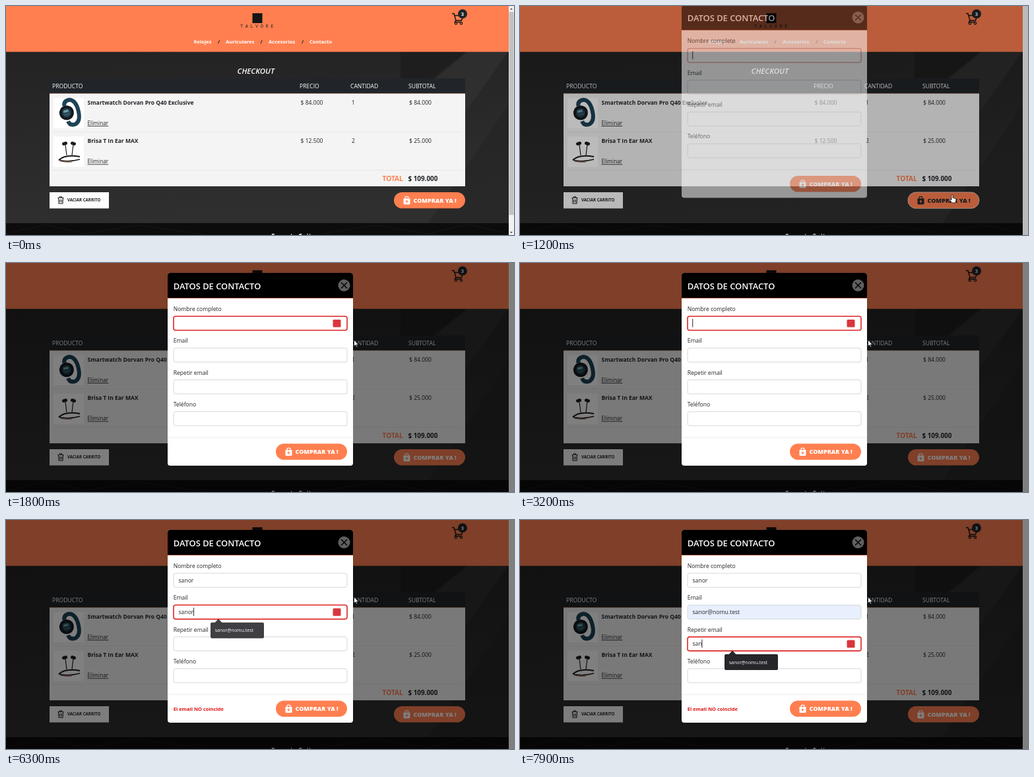
Animation, 770 px wide and 348 px high, one loop 8000 ms. Source, as an HTML page:

```html
<!DOCTYPE html>
<html lang="es">
<head>
<meta charset="utf-8">
<title>Checkout</title>
<style>
  html, body { margin: 0; width: 100%; height: 100%; overflow: hidden; background: #fff; }
  svg { display: block; width: 770px; height: 348px; }
  text { font-family: "Open Sans", "Noto Sans", sans-serif; font-size: 8.6px; fill: #212529; white-space: pre; }
  .b { font-weight: 700; }
  .w { fill: #fff; }
  .nav text { font-size: 7.6px; font-weight: 700; }
</style>
</head>
<body>
<svg id="stage" viewBox="0 0 770 348"></svg>
<script>
const ORANGE = '#ff7f50', RED = '#e02828', DARK = '#212529';
const MAIL = 'sanor@nomu.test', NAME = 'sanor';
const $ = id => document.getElementById(id);

const text = (x, y, s, attrs = '') => `<text x="${x}" y="${y}" ${attrs}>${s}</text>`;
const rect = (x, y, w, h, fill, attrs = '') =>
  `<rect x="${x}" y="${y}" width="${w}" height="${h}" fill="${fill}" ${attrs}/>`;
const path = (d, attrs = '') => `<path d="${d}" ${attrs}/>`;

const buyButton = (x, y, id) => `
  <g id="${id}" transform="translate(${x} ${y})" fill="#fff">
    ${rect(0, 0, 108, 24.6, ORANGE, 'rx="12.3" class="pill"')}
    ${path('M14.5 9.5h10v7.5q0 1.5-1.5 1.5h-7q-1.5 0-1.5-1.5z')}
    ${path('M17 9.5v-1q0-1.8 2.5-1.8t2.5 1.8v1', 'fill="none" stroke="#fff" stroke-width="1.2" class="handle"')}
    ${path('M17.3 14h4.4M19.5 11.8v4.4', `stroke="${ORANGE}" stroke-width="1.2"`)}
    <text x="29.5" y="15.8" style="font-size:9px;font-weight:800;fill:inherit">COMPRAR YA !</text>
  </g>`;

const productRow = (y, name, price, count, subtotal) => `
  ${rect(72, y + 7, 46, 46, '#fff')}
  ${text(123.5, y + 17, name, 'class="b" style="font-size:8.5px"')}
  ${text(123.5, y + 48, 'Eliminar', 'style="font-size:8.3px" text-decoration="underline"')}
  ${text(446.5, y + 17, price)}${text(524, y + 17, count)}${text(611, y + 17, subtotal)}
  ${rect(71, y + 58, 620, 0.7, '#e2e2e2')}`;

const background = `
  ${rect(0, 69, 762, 261, 'url(#wall)')}
  ${path('M598 69h100L598 150z', 'fill="#1c1c1c" opacity=".7"')}
  ${path('M700 69h62L640 240 598 215V155z', 'fill="#343434" opacity=".6"')}
  ${path('M762 150v180H640z', 'fill="#222" opacity=".5"')}
  ${rect(0, 330, 762, 18, '#0c0c0c')}
  ${path('M0 346 60 332 120 346 200 333 300 347M480 346 560 333 640 346 700 332 762 346', 'fill="none" stroke="#1c1c1c" stroke-width=".7"')}
  ${text(402, 354, 'Soporte Suite', 'class="b w" style="font-size:10px"')}`;

const header = `
  ${rect(0, 0, 762, 69.7, ORANGE)}
  ${rect(373.5, 11, 15, 15, '#151515')}
  <text x="355" y="33" style="font-family:'Noto Sans Mono',monospace;font-size:7px;letter-spacing:3.5px">TALVORE</text>
  <g class="nav">
    ${[[284.5, 'Relojes'], [333, 'Auriculares'], [398, 'Accesorios'], [460, 'Contacto']]
      .map(([x, s]) => text(x, 57.3, s, 'class="w"')).join('')}
    ${[321, 385.5, 448].map(x => text(x, 57.3, '/')).join('')}
  </g>
  ${path('M676 11.5h3l3 10.5h8.5l2.5-7.5H680M682 22l-1.5 2.5H691', 'fill="none" stroke="#151515" stroke-width="1.5"')}
  <circle cx="682" cy="26.2" r="1.7" fill="none" stroke="#151515" stroke-width="1.2"/>
  <circle cx="690" cy="26.2" r="1.7" fill="none" stroke="#151515" stroke-width="1.2"/>
  <circle cx="692" cy="12" r="7" fill="${DARK}"/>
  ${text(692, 14.8, '3', 'class="b w" style="font-size:7.5px" text-anchor="middle"')}`;

const watch = `
  <g transform="rotate(-14 97 162)">
    ${path('M91 150q1-8 10-7 9 3 9 19t-9 19q-9 1-10-7', 'fill="none" stroke="#1d4356" stroke-width="6"')}
    <circle cx="92" cy="161" r="11" fill="#14191e"/>
    <circle cx="92" cy="161" r="7" fill="#22404f"/>
    ${path('M88 157h7v3h-7zM88 163.500h8', 'fill="#6fa9b5" stroke="#56808c"')}
  </g>`;

const earphones = `
  <g fill="none" stroke="#1e1b1b">
    ${path('M90 211l2 16M102 210l-2 17', 'stroke-width="1.2"')}
    ${path('M87.500 209.500l3-1M100.500 208.500l3 1', 'stroke-width="5" stroke-linecap="round"')}
    ${path('M80 234q10-9 32-5M80 234q14 4 32-1', 'stroke-width="1.800"')}
    ${path('M82 236q10 2 18 1', 'stroke="#8a4a36"')}
  </g>`;

const cart = `
  ${text(350.5, 103.2, 'CHECKOUT', 'class="w" style="font-size:11.5px;font-weight:600;font-style:italic"')}
  ${rect(66, 110, 630, 23, DARK)}
  ${rect(66, 133, 630, 141, '#f4f4f4')}
  ${rect(66, 132.6, 630, 0.6, '#a8664c')}
  ${[[70, 'PRODUCTO'], [445, 'PRECIO'], [522, 'CANTIDAD'], [610, 'SUBTOTAL']]
    .map(([x, s]) => text(x, 125.2, s, 'class="w"')).join('')}
  ${productRow(133, 'Smartwatch Dorvan Pro Q40 Exclusive', '$ 84.000', 1, '$ 84.000')}
  ${productRow(191.4, 'Brisa T In Ear MAX', '$ 12.500', 2, '$ 25.000')}
  ${watch}${earphones}
  ${text(570.5, 265.5, 'TOTAL', `class="b" style="font-size:10.1px;fill:${ORANGE}"`)}
  ${text(609.5, 265.5, '$ 109.000', 'class="b" style="font-size:9.9px"')}
  ${rect(66, 283, 90, 24.6, '#fcfcfc')}
  ${path('M78.5 291.5h9M81.5 291.3v-1.5h3v1.5M79.5 292l.6 8.3h5.8l.6-8.3M81.8 294v4.5M84.2 294v4.5', 'fill="none" stroke="#212529" stroke-width="1.1"')}
  ${text(93, 297.3, 'VACIAR CARRITO', 'class="b" style="font-size:6.15px"')}
  ${buyButton(588, 283, 'buy')}`;

const field = (label, i) => {
  const y = 81 + i * 48.3;
  return `
    ${text(253.7, y - 8, label)}
    ${rect(254, y, 263, 21.3, '#fff', `id="bg${i}" rx="3" stroke="#ced4da" stroke-width=".9"`)}
    ${rect(254, y, 263, 21.3, 'none', `id="ring${i}" rx="3" stroke-width="1.6"`)}
    ${text(261.5, y + 13.7, '', `id="val${i}"`)}
    ${rect(0, y + 4, 0.9, 12.5, '#111', `id="caret${i}"`)}
    ${rect(495.5, y + 5, 12, 11.5, '#d9363e', `id="icon${i}" rx="1.5"`)}`;
};

const tip = (i, label, w) => {
  const y = 102.5 + i * 48.3;
  return `<g id="tip${i}">
    ${path(`M322 ${y - 0.5}l5.5 5.7h-11z`, 'fill="#26262b"')}
    ${rect(310, y + 5, w, 24, '#26262b', 'rx="2"')}
    ${text(316.7, y + 19.6, label, 'class="w" style="font-size:7px"')}</g>`;
};

const modal = `
  <g id="modal">
    ${rect(245, 15, 281, 293, '#fff', 'rx="4"')}
    ${path('M245 53.5V19q0-4 4-4h273q4 0 4 4v34.5z')}
    ${rect(245, 53, 281, 0.6, ORANGE)}
    ${text(253.7, 39.5, 'DATOS DE CONTACTO', 'class="w" style="font-size:12.9px;font-weight:600"')}
    <circle cx="512.5" cy="34" r="9" fill="#606060"/>
    ${path('M508 29.5l9 9m0-9l-9 9', 'stroke="#000" stroke-width="1.5"')}
    ${['Nombre completo', 'Email', 'Repetir email', 'Teléfono'].map(field).join('')}
    ${rect(245, 264.7, 281, 0.7, '#dee2e6')}
    ${text(253.7, 290, 'El email NO coincide', 'id="error" class="b" style="font-size:7.5px;fill:#dc1414"')}
    ${buyButton(409, 274.5, 'send')}
    ${tip(0, 'Sanor', 40)}${tip(1, MAIL, 81)}${tip(2, MAIL, 81)}
  </g>`;

const pointers = `
  <g fill="#fff" stroke="#000" stroke-width=".7" stroke-linejoin="round">
    ${path('M0 0v9.5l2.2-2 1.5 3.3 1.4-.6-1.5-3.2h3z', 'id="arrow"')}
    ${path('M-1 0q1-1 2 0v4.5l4 1q1.2.5 1 2l-1 4.5h-5.5l-3-4.5q0-1.3 1.3-.8l1.2 1z', 'id="hand"')}
  </g>`;

$('stage').innerHTML = `
  <defs><linearGradient id="wall" x2=".15" y2="1">
    <stop stop-color="#232323"/><stop offset=".5" stop-color="#292929"/><stop offset="1" stop-color="#2f2f2f"/>
  </linearGradient></defs>
  ${rect(762, 0, 8, 348, '#fff')}
  <g id="scroll">${rect(762, 0, 8, 348, '#f1f1f1')}${rect(762.5, 9, 7, 308.5, '#c1c1c1')}
    ${path('M764 5.5l2-2.5 2 2.5zM764 343l2 2.5 2-2.5z', 'fill="#555"')}</g>
  ${background}${header}${cart}
  ${rect(0, 0, 770, 348, '#000', 'id="shade"')}
  ${modal}${pointers}`;

const ramp = (t, start, len) => Math.min(1, Math.max(0, (t - start) / len));
const show = (id, on) => $(id).setAttribute('opacity', +on);
const easeOut = k => 1 - (1 - k) ** 1.7;

// keys: moment of each typed letter; tip: fade in and fade out
const fields = [
  { focus: 1200, blur: 4800, word: NAME, keys: [3600, 3700, 3800, 4100, 4300], valid: 3600, tip: [4050, 4700] },
  { focus: 4800, blur: 7200, word: NAME, keys: [5500, 5700, 5900, 6100, 6300], valid: 6900, fill: 6900, tip: [6035, 6850] },
  { focus: 7200, blur: 9000, word: MAIL, keys: [7500, 7800, 7900], valid: 9000, tip: [7450, 9000] },
  { focus: 9000, blur: 9000, word: '', keys: [], valid: 9000 }
];

function drawField(f, i, t) {
  const active = t >= f.focus && t < f.blur;
  const filled = t >= f.fill;
  const done = f.keys.filter(k => k <= t);
  const val = $('val' + i);
  val.textContent = filled ? MAIL : f.word.slice(0, done.length);
  $('bg' + i).setAttribute('fill', filled ? '#e8f0fe' : '#fff');
  $('ring' + i).setAttribute('stroke', t >= f.valid ? ORANGE : RED);
  show('ring' + i, ramp(t, f.focus - 45, 140) * (1 - ramp(t, f.blur, 150)));

  const last = Math.max(f.focus, ...done, filled ? f.fill : 0);
  $('caret' + i).setAttribute('x', 261.3 + val.getComputedTextLength());
  show('caret' + i, active && Math.floor((t - last) / 500) % 2 === 0);
  show('icon' + i, active && t >= 1500);
  if (f.tip) show('tip' + i, ramp(t, f.tip[0], 300) * (1 - ramp(t, f.tip[1], 285)));
}

function drawPointer(t) {
  const enter = easeOut(ramp(t, 100, 600)), leave = easeOut(ramp(t, 1300, 500));
  const x = 690 - 35 * enter - 127.5 * leave;
  const y = 328 - 41 * enter - 170 * leave;
  const hand = t >= 500 && t < 1400;
  for (const id of ['arrow', 'hand']) $(id).setAttribute('transform', `translate(${x} ${y})`);
  show('arrow', t >= 100 && !hand);
  show('hand', hand);

  const ink = hand ? DARK : '#fff';
  const buy = $('buy'), pill = buy.querySelector('.pill');
  buy.setAttribute('fill', ink);
  buy.querySelector('.handle').setAttribute('stroke', ink);
  pill.setAttribute('stroke', hand && t >= 900 ? '#e8d8d0' : 'none');
  pill.setAttribute('stroke-width', 0.8);
}

function draw(t) {
  const fade = ramp(t, 1120, 150);
  show('scroll', t < 1200);
  show('shade', fade * 0.5);
  show('modal', fade);
  $('modal').setAttribute('transform', `translate(0 ${-28 * (1 - easeOut(ramp(t, 1120, 300)))})`);
  show('error', t >= 5500);
  fields.forEach((f, i) => drawField(f, i, t));
  drawPointer(t);
}

const start = performance.now();
function tick() {
  const t = (performance.now() - start + 20) % 8000;
  draw(Math.floor(t / 100) * 100);
  requestAnimationFrame(tick);
}
tick();
</script>
</body>
</html>
```
